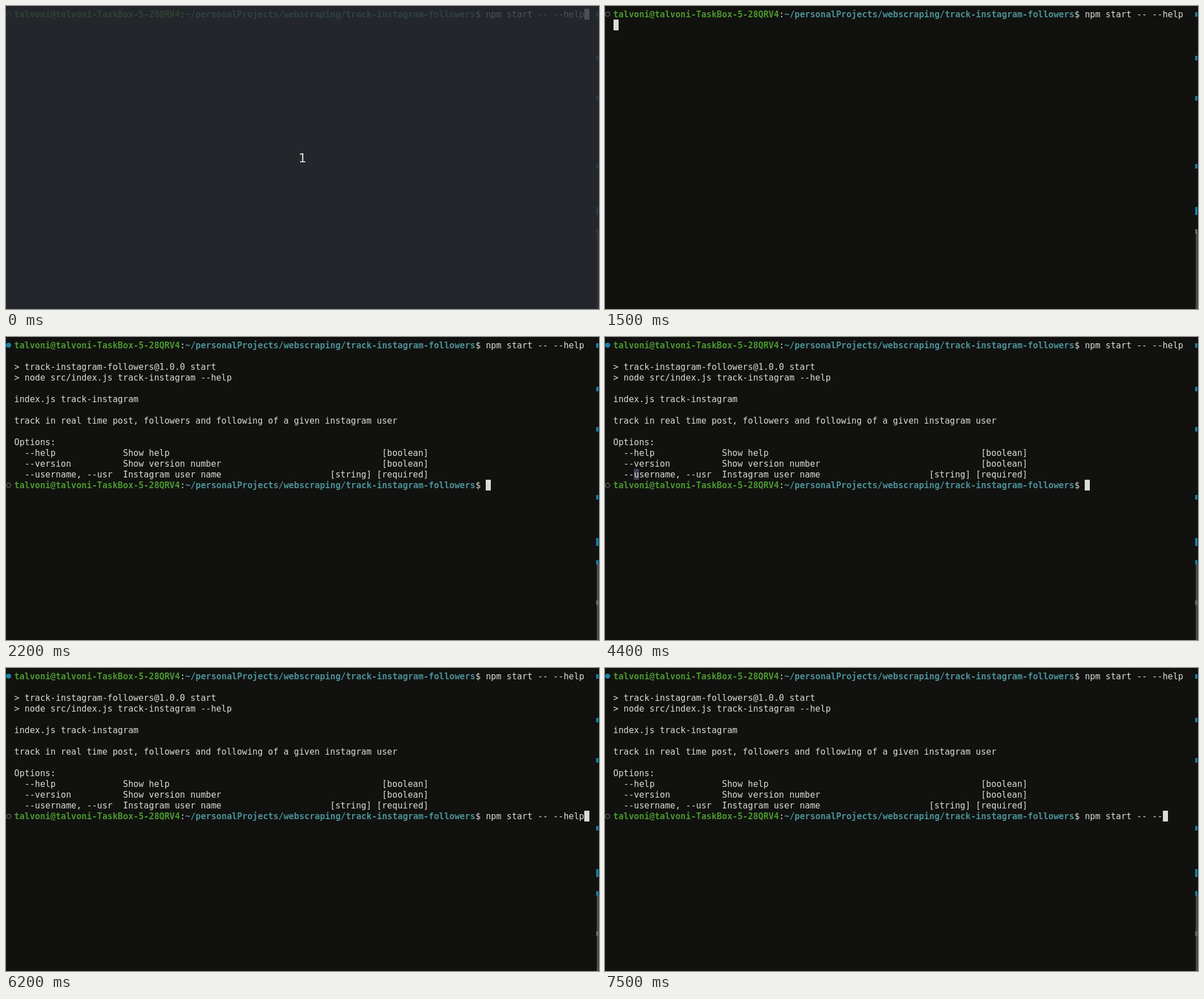
Recreate the animation shown at these times as an HTML page with a canvas. Size 1047 by 535 pixels, loop 8000 ms.

```html
<!DOCTYPE html>
<html lang="en">
<head>
<meta charset="utf-8">
<title>Terminal session</title>
<style>
html, body { margin: 0; width: 100%; height: 100%; overflow: hidden; background: #11120f; }
canvas { display: block; }
</style>
</head>
<body>
<canvas id="stage" width="1047" height="535"></canvas>
<script>
const ctx = document.getElementById("stage").getContext("2d");
const LOOP = 8000, LEFT = 14.5, TOP = 4.9, CELL_W = 9.151, CELL_H = 19.04;
const TEXT = "#dcdcd5", GREEN = "#4b972f", TEAL = "#4c9098", BLUE = "#1b81a8", GRAY = "#6a6a68";

const USER = "talvoni@talvoni-TaskBox-5-28QRV4";
const PATH = "~/personalProjects/webscraping/track-instagram-followers";
const COMMAND = "npm start -- --help";
const COMMAND_COL = USER.length + PATH.length + 3;

const option = (flag, about, type) => "  " + flag.padEnd(19) + about.padEnd(59 - type.length) + type;
const output = [
  "",
  "> track-instagram-followers@1.0.0 start",
  "> node src/index.js track-instagram --help",
  "",
  "index.js track-instagram",
  "",
  "track in real time post, followers and following of a given instagram user",
  "",
  "Options:",
  option("--help", "Show help", "[boolean]"),
  option("--version", "Show version number", "[boolean]"),
  option("--username, --usr", "Instagram user name", "[string] [required]")
];

const colX = col => LEFT + col * CELL_W;
const rowY = row => TOP + row * CELL_H;

function box(x, y, w, h, color) {
  ctx.fillStyle = color;
  ctx.fillRect(x, y, w, h);
}

function cells(col, row, count, color) {
  const x = Math.round(colX(col)), y = Math.round(rowY(row));
  box(x, y, Math.round(colX(col + count)) - x, Math.round(rowY(row + 1)) - y, color);
}

const cursor = (col, row) => cells(col, row, 1, TEXT);

function write(text, col, row, color = TEXT, weight = "") {
  ctx.font = `${weight} 15.2px "DejaVu Sans Mono", monospace`;
  ctx.fillStyle = color;
  ctx.fillText(text, colX(col), Math.round(rowY(row) + 14.8));
}

function prompt(row, command, done) {
  ctx.beginPath();
  ctx.arc(4.6, rowY(row) + 9.5, done ? 4.5 : 3.8, 0, 2 * Math.PI);
  if (done) {
    ctx.fillStyle = BLUE;
    ctx.fill();
  } else {
    ctx.strokeStyle = GRAY;
    ctx.lineWidth = 1.3;
    ctx.stroke();
  }
  write(USER, 0, row, GREEN, "bold");
  write(":", USER.length, row);
  write(PATH, USER.length + 1, row, TEAL, "bold");
  write("$ " + command, COMMAND_COL - 2, row);
}

function ruler(done) {
  box(1043, 401, 4, 134, "#4b4b49");
  for (const y of [11, 88, 159, 279]) box(1042, y, 4, 8, BLUE);
  box(1042, 355, 4, 14, BLUE);
  box(1042, 394, 4, 8, done ? BLUE : GRAY);
  if (done) box(1042, 465, 4, 8, GRAY);
}

function countdown() {
  box(0, 0, 1047, 535, "rgba(40, 44, 52, 0.8)");
  ctx.font = '22px "DejaVu Sans", sans-serif';
  ctx.fillStyle = "#e0e0e0";
  ctx.textAlign = "center";
  ctx.fillText("1", 523.5, 276);
  ctx.textAlign = "left";
}

function draw(t) {
  const done = t >= 2200;
  box(0, 0, 1047, 535, "#11120f");
  ruler(done);
  prompt(0, COMMAND, done);

  if (t >= 4400 && t < 5200) {
    const step = Math.min(5, Math.floor((t - 4400) / 100));
    cells(4, 12, Math.round(1 + 28 * step / 5), "#3e4256");
  }
  const shown = done ? output.length : t >= 1800 ? 4 : 0;
  output.slice(0, shown).forEach((line, i) => write(line, 0, i + 1));

  if (done) {
    const erased = [6600, 6800, 7100, 7500].filter(at => t >= at).length;
    const typed = t < 6200 ? "" : COMMAND.slice(0, COMMAND.length - erased);
    prompt(13, typed, false);
    cursor(COMMAND_COL + typed.length, 13);
  } else if (t >= 1500) {
    cursor(0, t >= 1800 ? 5 : 1);
  } else {
    cursor(COMMAND_COL + COMMAND.length, 0);
  }
  if (t < 100) countdown();
}

const start = performance.now();
function frame() {
  draw((performance.now() - start) % LOOP);
  requestAnimationFrame(frame);
}
frame();
</script>
</body>
</html>
```
